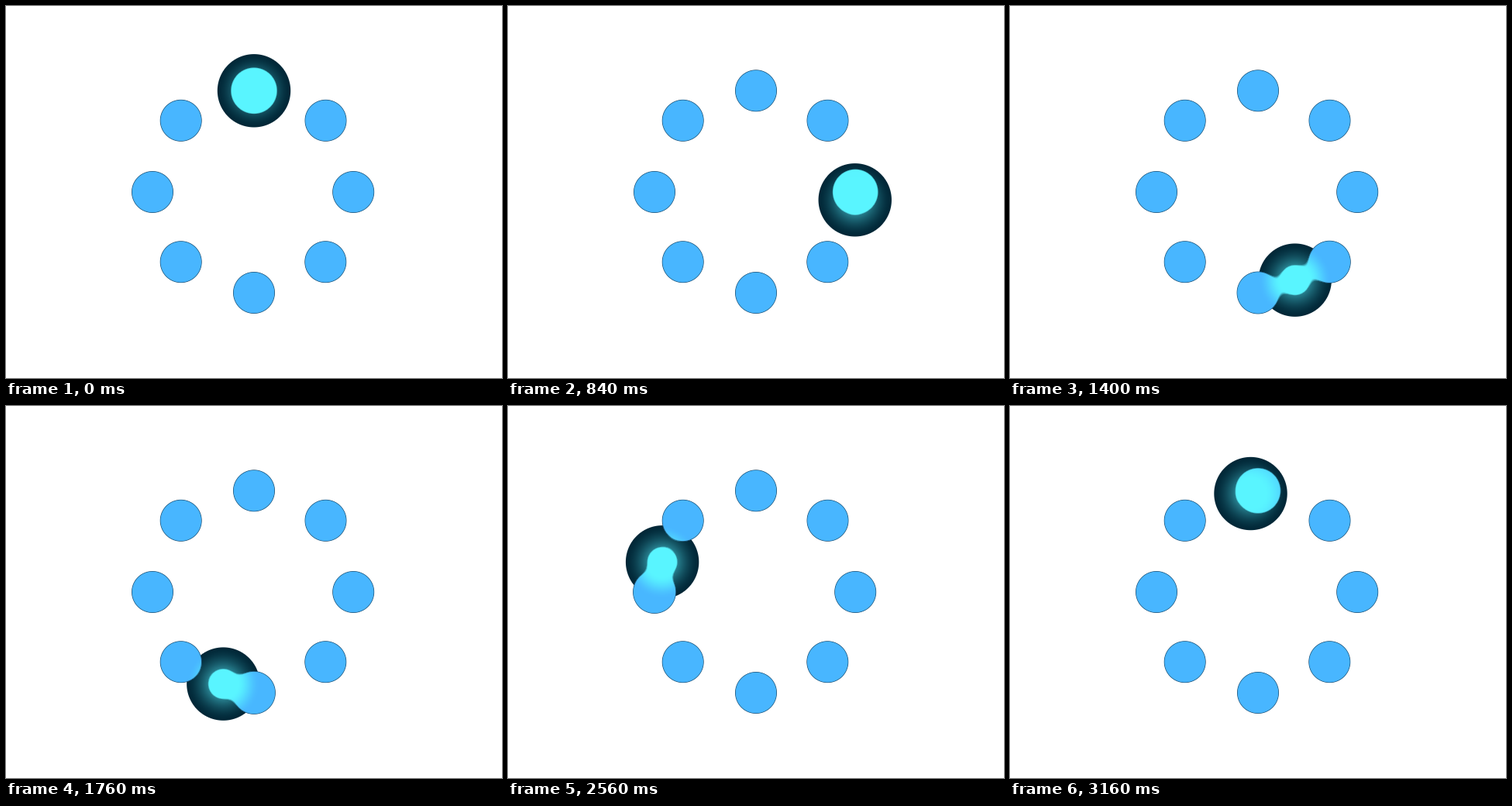
Recreate the animation shown at these times as an HTML page with a canvas. Size 640 by 480 pixels, loop 3200 ms.

```html
<!DOCTYPE html>
<html lang="en">
<head>
<meta charset="utf-8">
<title>Loading ring</title>
<style>
  html, body { margin: 0; width: 100%; height: 100%; overflow: hidden; background: #fff; }
  canvas { display: block; width: 640px; height: 480px; }
</style>
</head>
<body>
<canvas id="stage" width="640" height="480"></canvas>
<script>
const W = 640, H = 480;
const LOOP = 3200, STEP = 40, HOP = 400;
const DOT_R = 27, BALL_R = 19.5, GLOW_R = 47.2;
const REACH = 110;

const DOTS = [
  [320, 109.3], [412.5, 147.8], [448.2, 240], [412.3, 330.2],
  [320, 370], [225.7, 330.2], [189, 240], [225.7, 147.8]
];

const WHITE = [255, 255, 255];
const BLUE = [72, 182, 255];
const CYAN = [89, 245, 255];
const RIM = [8, 35, 55];
const GLOW_IN = [40, 130, 145];
const GLOW_OUT = [1, 39, 55];

const ctx = document.getElementById('stage').getContext('2d');

const clamp = v => Math.max(0, Math.min(1, v));
const mix = (a, b, t) => a.map((v, i) => v + (b[i] - v) * t);
const smooth = (a, b, v) => {
  const t = clamp((v - a) / (b - a));
  return t * t * (3 - 2 * t);
};

// Joins two distance fields with a soft neck of width k.
function join(a, b, k) {
  const h = Math.max(k - Math.abs(a - b), 0);
  return Math.min(a, b) - (k > 0 ? h * h / (4 * k) : 0);
}

// The ball leaves each dot along the ring and straightens out on arrival.
function poseAt(time) {
  const hop = time / HOP;
  const from = Math.floor(hop) % 8;
  const to = (from + 1) % 8;
  const u = hop - Math.floor(hop);
  const [ax, ay] = DOTS[from], [bx, by] = DOTS[to];
  const dx = bx - ax, dy = by - ay;
  const bulge = 44 * u * (1 - u) ** 2.5 / Math.hypot(dx, dy);
  const x = ax + dx * u + dy * bulge;
  const y = ay + dy * u - dx * bulge;

  const dots = DOTS.map(([cx, cy], i) => {
    const gap = Math.hypot(cx - x, cy - y);
    const near = i === from || i === to;
    return {
      x: cx, y: cy,
      r: DOT_R + (near ? 2.8 * Math.max(0, 1 - gap / 60) : 0),
      k: near ? 18 * Math.min(1, gap / 45) ** 2 : 0,
      lit: i === from ? clamp(1.3 - 3.2 * u)
         : i === to ? clamp((u - 0.48) * 1.1) : 0
    };
  });
  return { x, y, dots };
}

function shade(px, py, pose) {
  const q = Math.hypot(px - pose.x, py - pose.y);
  const ball = q - BALL_R;
  let d = ball, nearest = 1e9, lit = 0;
  for (const dot of pose.dots) {
    const e = Math.hypot(px - dot.x, py - dot.y) - dot.r;
    d = Math.min(d, join(e, ball, dot.k));
    if (e < nearest) { nearest = e; lit = dot.lit; }
  }

  let color = WHITE;
  if (q < GLOW_R + 1) {
    const fade = (1 - clamp((q - 19) / 28)) ** 1.6;
    color = mix(color, mix(GLOW_OUT, GLOW_IN, fade), clamp(GLOW_R + 0.5 - q));
  }
  if (d < 0.5) {
    const heat = lit + (1 - lit) * (1 - smooth(18, 47, q));
    const rim = clamp(1 - Math.abs(d + 0.2)) * 0.75 * (1 - 0.7 * heat);
    color = mix(color, mix(mix(BLUE, CYAN, heat), RIM, rim), clamp(0.5 - d));
  }
  return color;
}

function paint(x0, y0, w, h, pose) {
  const img = ctx.createImageData(w, h);
  for (let y = 0, i = 0; y < h; y++) {
    for (let x = 0; x < w; x++, i += 4) {
      const c = shade(x0 + x + 0.5, y0 + y + 0.5, pose);
      img.data[i] = c[0];
      img.data[i + 1] = c[1];
      img.data[i + 2] = c[2];
      img.data[i + 3] = 255;
    }
  }
  ctx.putImageData(img, x0, y0);
}

const resting = {
  x: -999, y: -999,
  dots: DOTS.map(([x, y]) => ({ x, y, r: DOT_R, k: 0, lit: 0 }))
};
paint(0, 0, W, H, resting);
const base = ctx.getImageData(0, 0, W, H);

let shown = -1;
function tick() {
  const time = Math.floor(performance.now() % LOOP / STEP) * STEP;
  if (time !== shown) {
    shown = time;
    const pose = poseAt(time);
    ctx.putImageData(base, 0, 0);
    paint(Math.round(pose.x) - REACH, Math.round(pose.y) - REACH, 2 * REACH, 2 * REACH, pose);
  }
  requestAnimationFrame(tick);
}
tick();
</script>
</body>
</html>
```
